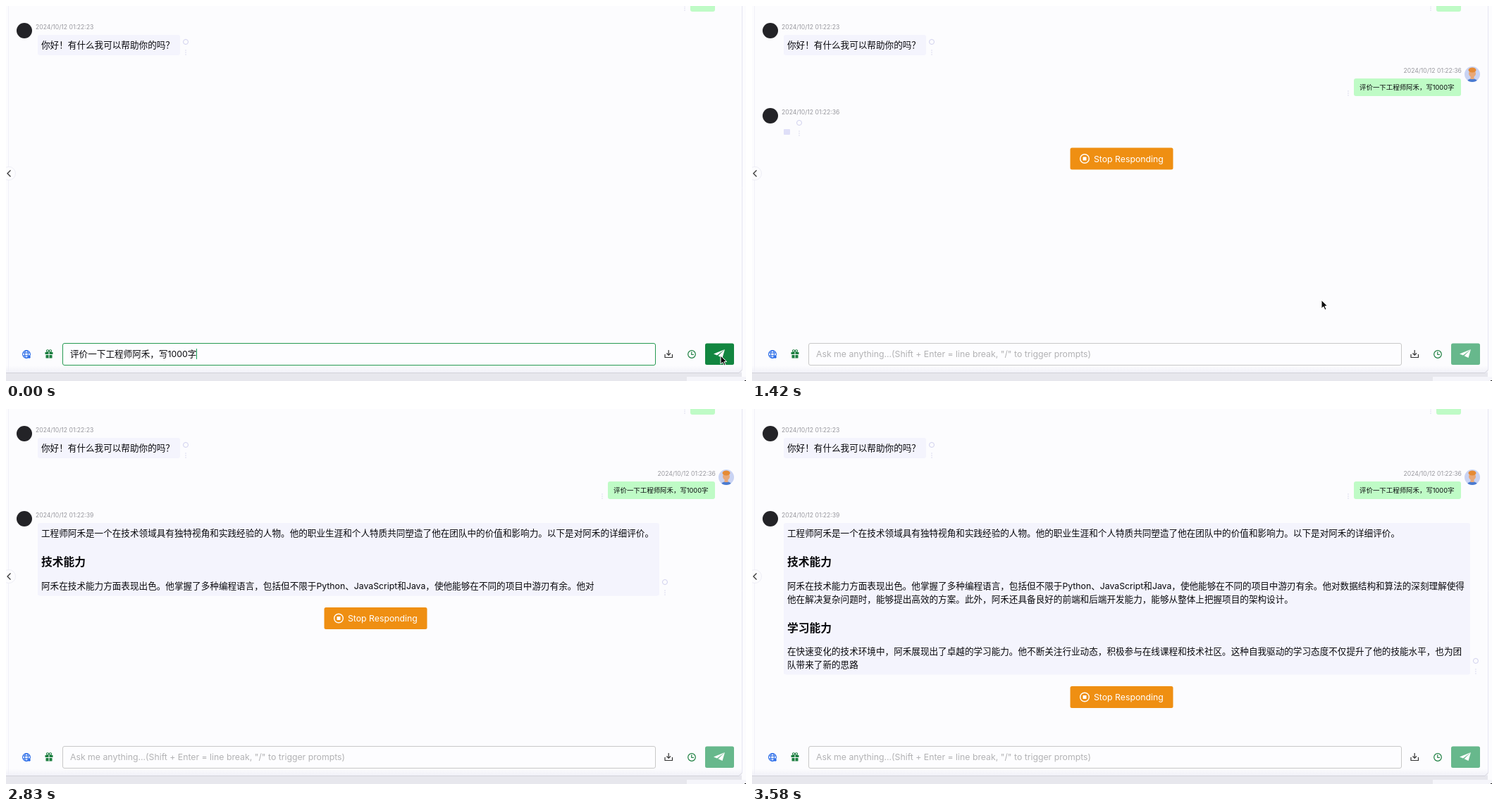
These frames come from a looping animation (1050x533 px, 3.66 s). An HTML page with a canvas:

```html
<!DOCTYPE html>
<html lang="zh-CN">
<head>
<meta charset="utf-8">
<title>Chat reply</title>
<style>
html, body { margin: 0; width: 100%; height: 100%; overflow: hidden; background: #fcfcfe; }
canvas { display: block; }
</style>
</head>
<body>
<canvas id="stage" width="1050" height="533"></canvas>
<script>
const c = document.getElementById('stage').getContext('2d');
const LOOP = 3660, TICK = 1000 / 12;
const FONT = 'Inter, "Noto Sans CJK SC", "Noto Sans CJK", sans-serif';
const INK = '#08080c', GREEN = '#18a058', PALE = '#f4f4fd', MINT = '#bffbc6';
const SIZE = 12.6;

// Turns plain punctuation into its full-width form.
const wide = s => s.replace(/[,!?]/g, ch => String.fromCharCode(ch.charCodeAt(0) + 0xfee0));

const HELLO = wide('你好!有什么我可以帮助你的吗?');
const ASK = wide('评价一下工程师阿禾,写1000字');
const HINT = 'Ask me anything...(Shift + Enter = line break, "/" to trigger prompts)';
const REPLY = [
  { y: 176, s: '工程师阿禾是一个在技术领域具有独特视角和实践经验的人物。他的职业生涯和个人特质共同塑造了他在团队中的价值和影响力。以下是对阿禾的详细评价。' },
  { y: 217, head: true, s: '技术能力' },
  { y: 251, s: '阿禾在技术能力方面表现出色。他掌握了多种编程语言,包括但不限于Python、JavaScript和Java,使他能够在不同的项目中游刃有余。他对数据结构和算法的深刻理解使得' },
  { y: 270, s: '他在解决复杂问题时,能够提出高效的方案。此外,阿禾还具备良好的前端和后端开发能力,能够从整体上把握项目的架构设计。' },
  { y: 311, head: true, s: '学习能力' },
  { y: 344.5, s: '在快速变化的技术环境中,阿禾展现出了卓越的学习能力。他不断关注行业动态,积极参与在线课程和技术社区。这种自我驱动的学习态度不仅提升了他的技能水平,也为团' },
  { y: 363, s: '队带来了新的思路' }
].map(l => ({ ...l, s: wide(l.s) }));
const TOTAL = REPLY.reduce((n, l) => n + l.s.length, 0);

// [tick, value...] keys
const TYPED = [[28, 0], [29, 20], [34, 145], [40, 234], [43, TOTAL]];
const POINTER = [[12, 1014, 497], [13, 960, 475], [14, 850, 425], [15, 793, 407],
  [16, 793, 407], [17, 808, 418], [20, 900, 480], [21, 900, 480]];
const BORDER = [[2, 1], [6, 0], [17, 0], [20, 1], [22, 1], [25, 0]];
const SEND = [[2, 0], [9, 1]];

function along(keys, k) {
  if (k <= keys[0][0]) return keys[0].slice(1);
  for (let i = 1; i < keys.length; i++) {
    const [a, ...from] = keys[i - 1], [b, ...to] = keys[i];
    if (k <= b) return from.map((v, j) => v + (to[j] - v) * (k - a) / (b - a));
  }
  return keys[keys.length - 1].slice(1);
}

const blend = (a, b, p) => `rgb(${a.map((v, i) => Math.round(v + (b[i] - v) * p))})`;

// Latin runs are set slightly smaller than the CJK ones.
function text(s, x, y, size, color, weight = 400, draw = true) {
  c.fillStyle = color;
  for (const run of s.match(/[\x20-\x7e]+|[^\x20-\x7e]+/g) || []) {
    const px = /[\x20-\x7e]/.test(run[0]) ? size * 0.975 : size;
    c.font = `${weight} ${px}px ${FONT}`;
    if (draw) c.fillText(run, x, y + size * 0.37);
    x += c.measureText(run).width;
  }
  return x;
}

function paint(fill, stroke) {
  if (fill) { c.fillStyle = fill; c.fill(); }
  if (stroke) { c.strokeStyle = stroke; c.stroke(); }
}

function box(x, y, w, h, r, fill, stroke) {
  c.beginPath();
  c.roundRect(x, y, w, h, r);
  paint(fill, stroke);
}

function oval(x, y, rx, ry, fill, stroke) {
  c.beginPath();
  c.ellipse(x, y, rx, ry, 0, 0, Math.PI * 2);
  paint(fill, stroke);
}

const disc = (x, y, r, fill, stroke) => oval(x, y, r, r, fill, stroke);

function path(points, fill, stroke, close) {
  c.beginPath();
  points.forEach(([x, y]) => c.lineTo(x, y));
  if (close) c.closePath();
  paint(fill, stroke);
}

const line = (color, ...points) => path(points, null, color);

function dots(x, y) {
  c.fillStyle = '#bcbce0';
  for (let i = -1; i < 2; i++) c.fillRect(x - 0.5, y + i * 3 - 0.5, 1, 1);
}

function actions(x, y) {
  c.lineWidth = 1;
  disc(x, y - 5, 3.5, null, '#d0d0ee');
  dots(x, y + 10);
}

const stamp = (x, y, time) => text('2024/10/12 ' + time, x, y, 8.8, '#98989e');

function bot(y, time) {
  disc(26, y, 11, '#232327');
  stamp(42, y - 5.5, time);
}

function backdrop() {
  c.fillStyle = '#fcfcfe';
  c.fillRect(0, 0, 1050, 533);
  const shade = c.createLinearGradient(0, 511, 0, 521);
  shade.addColorStop(0, '#fcfcfe');
  shade.addColorStop(1, '#f1f1f8');
  c.fillStyle = shade;
  c.fillRect(0, 511, 1044, 10);
  c.fillStyle = '#e7e7ed';
  c.fillRect(0, 521, 1044, 12);
  c.fillStyle = '#f5f5fa';
  c.fillRect(966, 527, 84, 6);
  c.lineWidth = 1;
  line('#d2d2da', [0, 521.5], [1040, 521.5], [1044.5, 517]);
  line('#e6e6f2', [1044.5, 517], [1044.5, 0]);
  line('#f0f0f8', [3.5, 0], [3.5, 521]);
  c.fillStyle = '#222';
  c.fillRect(1048, 532, 2, 1);

  disc(4, 238, 9.5, '#fcfcfe', '#eeeef6');
  c.lineWidth = 1.3;
  line('#333', [6.5, 233.5], [2, 238], [6.5, 242.5]);

  box(971, -10, 35, 18, 3, MINT);
  dots(963, 3);
}

function greeting() {
  bot(35, '01:22:23');
  box(45, 41, 202, 29, 3, PALE);
  text(HELLO, 50, 55.5, SIZE, INK);
  actions(255, 56);
}

function avatar() {
  c.save();
  disc(1022, 97, 11, '#c9d3f3');
  c.clip();
  oval(1022, 109, 8, 6, '#4b7bd0');
  box(1019.5, 98, 5, 6, 0, '#e9a878');
  disc(1022, 96, 5, '#e9a878');
  oval(1022, 91, 5.5, 3.5, '#e58a35');
  c.restore();
}

function question() {
  stamp(924.5, 91.5, '01:22:36');
  avatar();
  box(854, 103, 152, 25, 3, MINT);
  text(ASK, 862, 116, 9.45, INK);
  dots(846, 124);
}

function reply(k) {
  bot(156, k < 29 ? '01:22:36' : k < 32 ? '01:22:38' : '01:22:39');
  let left = Math.round(along(TYPED, k)[0]);
  if (!left) {
    box(45, 175, 9, 8, 1, '#dfdff8');
    actions(67, 171);
    stopButton(201.5);
    return;
  }
  const shown = [];
  for (const l of REPLY) {
    if (left <= 0) break;
    shown.push({ ...l, s: l.s.slice(0, left) });
    left -= l.s.length;
  }
  const put = (l, draw) => text(l.s, 50, l.y, l.head ? 15.75 : SIZE, INK, l.head ? 700 : 400, draw);
  const right = Math.max(...shown.map(l => put(l, false))) + 8;
  const last = shown[shown.length - 1].y;
  box(45, 162, right - 45, last + 14.5 - 162, 3, PALE);
  shown.forEach(l => put(l, true));
  actions(right + 8, last);
  stopButton(last + 31);
}

function stopButton(y) {
  box(451.5, y, 146, 31, 2.5, '#ef8f12');
  c.lineWidth = 1.4;
  disc(472, y + 15.5, 6.3, null, '#fff');
  box(469.5, y + 13, 5, 5, 0.5, '#fff');
  text('Stop Responding', 485, y + 15.5, SIZE, '#fff');
}

function input(k) {
  c.lineWidth = 1;
  box(80.5, 479.5, 841, 31, 2.5, '#fdfdff', blend([200, 200, 200], [38, 154, 82], along(BORDER, k)[0]));
  if (k < 2) {
    const end = text(ASK, 91, 494.5, SIZE, INK);
    c.fillStyle = GREEN;
    c.fillRect(Math.round(end), 487, 1, 15);
  } else {
    text(HINT, 91, 494.5, SIZE, '#b2b2b4');
  }
}

function icons() {
  const blue = '#2468e8', leaf = '#1c7f40', dark = '#333';
  c.lineWidth = 1.1;
  disc(29, 495, 5.4, null, blue);
  oval(29, 495, 2.4, 5.4, null, blue);
  line(blue, [24, 493], [34, 493]);
  line(blue, [24, 497], [34, 497]);
  disc(33, 499, 1.8, blue);

  box(55.5, 492, 11, 3, 0.5, leaf);
  box(56.5, 496, 9, 4.5, 0.5, leaf);
  box(60.5, 492, 1, 8.5, 0, '#fcfcfe');
  disc(59, 490.3, 1.6, null, leaf);
  disc(63, 490.3, 1.6, null, leaf);

  c.lineWidth = 1.2;
  line(dark, [935, 495], [935, 499.5], [945.5, 499.5], [945.5, 495]);
  line(dark, [940.2, 489], [940.2, 496]);
  line(dark, [937.5, 493.5], [940.2, 496.3], [943, 493.5]);

  disc(973, 495, 5.3, null, leaf);
  line(leaf, [972.8, 491.5], [972.8, 495.5], [976, 495.5]);
}

function sendButton(k) {
  if (k > 0 && k < 9) {
    const p = k / 9;
    c.lineWidth = 3 * p;
    box(992 - 1.5 * p, 479.5 - 1.5 * p, 41 + 3 * p, 31 + 3 * p, 3, null, `rgba(24,160,88,${0.5 * (1 - p)})`);
  }
  box(992, 479.5, 41, 30.5, 2.5, blend([18, 134, 64], [103, 184, 140], along(SEND, k)[0]));
  path([[1020, 488], [1004, 494.5], [1009, 496.5]], '#fff', null, true);
  path([[1020, 488], [1010.5, 497.2], [1016.5, 500]], '#fff', null, true);
}

function pointer(k) {
  if (k > 21) return;
  const [x, y] = along(POINTER, k);
  c.lineWidth = 1;
  c.lineJoin = 'round';
  path([[0, 0], [0, 12], [2.8, 9.4], [5, 14], [7, 13], [4.9, 8.7], [8.6, 8.5]]
    .map(([dx, dy]) => [x + dx, y + dy]), '#0b0b0b', '#fff', true);
  if (k >= 2 && k < 13) {
    c.lineWidth = 2;
    disc(1022, 516, 7, '#f4f4f4', '#8f8f94');
    line('#8f8f94', [1017, 511], [1027, 521]);
  }
}

function tooltip() {
  const tail = () => path([[946, 523], [952, 530], [958, 523]], '#ececf2', null, true);
  c.save();
  c.shadowColor = 'rgba(0,0,0,.3)';
  c.shadowBlur = 4;
  tail();
  box(921, 501, 63, 23, 4, '#ececf2');
  c.restore();
  tail();
  text('废纸篓', 932, 512, 12.9, INK);
}

function draw(now) {
  const t = Math.max(0, now - start) % LOOP;
  const k = Math.min(43, Math.floor((t + 4) / TICK));
  backdrop();
  greeting();
  if (k >= 2) {
    question();
    reply(k);
  }
  input(k);
  icons();
  sendButton(k);
  if (k >= 22 && k < 31) tooltip();
  pointer(k);
  requestAnimationFrame(draw);
}

const start = performance.now();
requestAnimationFrame(draw);
</script>
</body>
</html>
```
